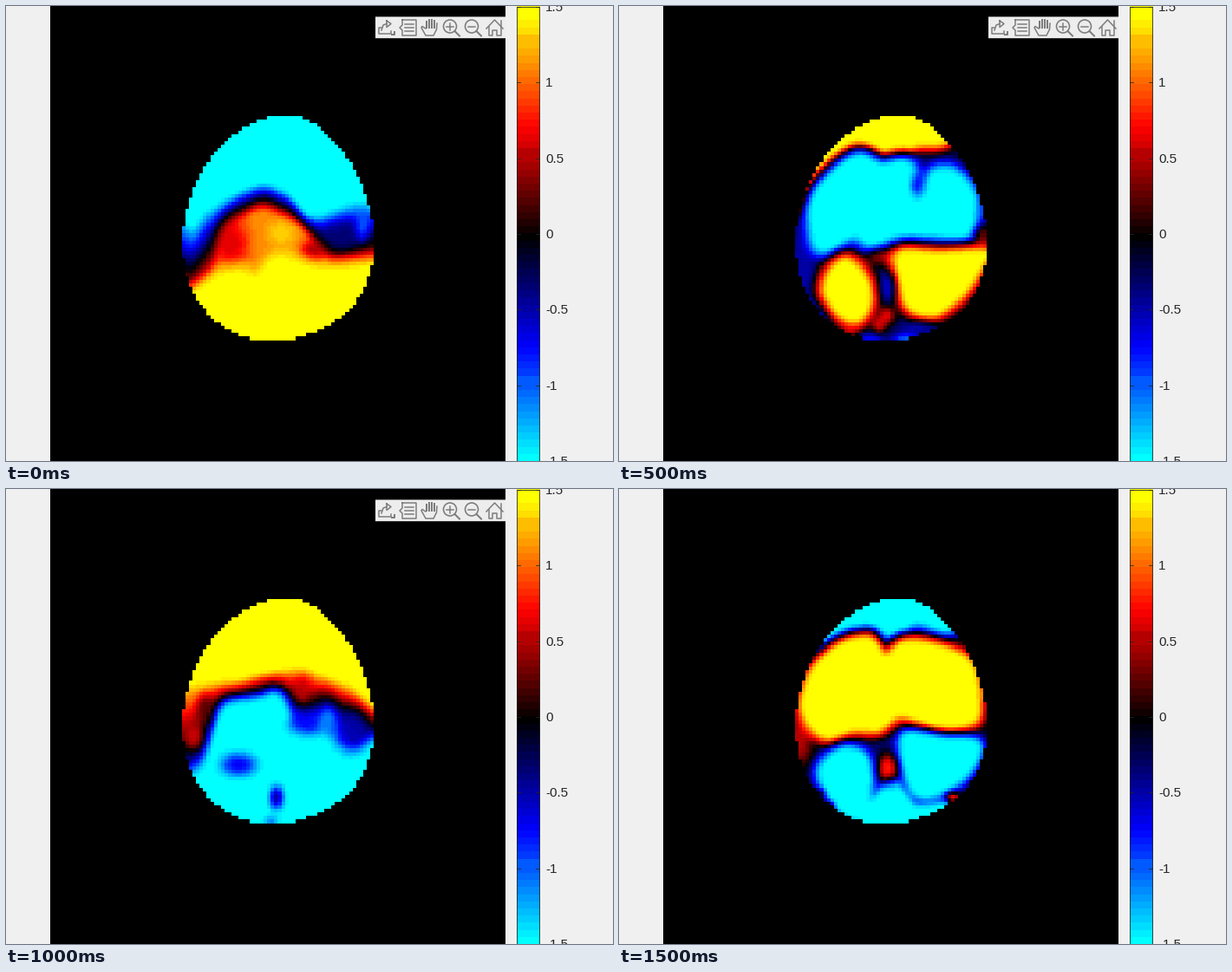
A matplotlib script for the animation above (2000 ms loop, 700 by 525 pixels).

```python
import numpy as np
import matplotlib.pyplot as plt
from matplotlib.animation import FuncAnimation
from matplotlib.colors import LinearSegmentedColormap
from matplotlib.patches import Circle, Rectangle
from matplotlib.path import Path

W, H, DPI = 700, 525, 100
LEFT, N = 51, 128
CELL = H / N
TOP = 1.5
INK, GREY = "#262626", "#7c7c7c"

xs = LEFT + (np.arange(N) + 0.5) * CELL
ys = (np.arange(N) + 0.5) * CELL
X, Y = np.meshgrid(xs, ys)

# An odd number of colours keeps the middle one pure black.
cmap = LinearSegmentedColormap.from_list(
    "coldhot", ["#00ffff", "#0000ff", "#000000", "#ff0000", "#ffff00"], N=63)


def px(size):
    return size * 72 / DPI


# Field helpers; all positions are in stage pixels.

def edge(points):
    """Height of a smooth line through key points, per column."""
    line = np.interp(xs, *zip(*points))
    return np.convolve(np.pad(line, 2, mode="edge"),
                       np.array([1, 2, 3, 2, 1]) / 9, "valid")


def band(upper, lower, start, end):
    """Ramp from one value to another between two lines."""
    a, b = edge(upper), edge(lower)
    return start + (end - start) * np.clip((Y - a) / (b - a), 0, 1)


def below(field, points, value, fade):
    t = np.clip(1 - (edge(points) - Y) / fade, 0, 1)
    return field + (value - field) * t


def smooth_loop(points, steps=5):
    """Closed Catmull-Rom curve through key points."""
    p = np.array(points, float)
    a, c, d = (np.roll(p, k, axis=0) for k in (1, -1, -2))
    out = [p + 0.5 * t * (c - a + t * (2 * a - 5 * p + 4 * c - d
                                       + t * (3 * (p - c) + d - a)))
           for t in np.arange(steps) / steps]
    return np.stack(out, axis=1).reshape(-1, 2)


def blob(field, points, value, fade):
    """Fill a smooth outline with a value that fades out around it."""
    pts = smooth_loop(points)
    dist = np.full(X.shape, np.inf)
    for (ax_, ay), (dx, dy) in zip(pts, np.roll(pts, -1, axis=0) - pts):
        t = ((X - ax_) * dx + (Y - ay) * dy) / (dx * dx + dy * dy)
        t = np.clip(t, 0, 1)
        dist = np.minimum(dist, np.hypot(X - ax_ - t * dx, Y - ay - t * dy))
    inside = Path(pts).contains_points(np.c_[X.ravel(), Y.ravel()])
    dist[inside.reshape(X.shape)] = 0
    return field + (value - field) * np.clip(1 - dist / fade, 0, 1)


def spot(field, x, y, rx, ry, value):
    """Pull the field towards a value in a soft ellipse."""
    r2 = ((X - x) / rx) ** 2 + ((Y - y) / ry) ** 2
    return field + (value - field) * np.exp(-r2 ** 1.5)


def soften(field):
    for axis in (0, 1):
        field = (np.roll(field, 1, axis) + 2 * field
                 + np.roll(field, -1, axis)) / 4
    return field


def egg():
    """Ellipse that is wider below, with its ends leaning sideways."""
    u = np.clip((Y - 256.5) / 130, -1, 1)
    half = 109.5 * np.sqrt(1 - u * u) * (1 + 0.135 * u)
    return np.abs(X - 314 + 8.5 * u ** 5) < half


# The four poses of the oscillation.

def front_cold():
    f = band([(204, 238), (214, 264), (226, 238), (270, 213), (300, 203),
              (328, 217), (345, 241), (365, 242), (400, 223), (424, 226)],
             [(204, 350), (235, 322), (256, 262), (285, 238), (300, 236),
              (330, 250), (345, 260), (362, 288), (380, 308), (424, 306)],
             -1.5, 1.15)
    f = spot(f, 388, 265, 26, 20, -0.35)
    f = spot(f, 411, 254, 8, 17, -1.0)
    f = spot(f, 260, 274, 20, 30, 0.65)
    f = spot(f, 354, 283, 14, 13, 0.5)
    f = spot(f, 318, 262, 16, 14, 1.35)
    return below(f, [(204, 342), (245, 313), (270, 307), (292, 320),
                     (300, 297), (320, 293), (365, 308), (424, 300)],
                 1.5, 20)


def middle_cold():
    f = np.full(X.shape, -0.2)
    f = spot(f, 212, 295, 16, 50, -0.5)
    f = spot(f, 230, 352, 18, 16, -0.7)
    f = blob(f, [(190, 240), (213, 211), (236, 183), (262, 161), (280, 156),
                 (312, 169), (345, 160), (375, 157), (400, 130),
                 (315, 90), (200, 120)], 1.5, 14)
    f = spot(f, 402, 186, 10, 12, 0.1)
    f = blob(f, [(222, 240), (231, 210), (255, 185), (280, 174), (303, 184),
                 (326, 179), (341, 192), (333, 213), (350, 213), (364, 191),
                 (390, 193), (409, 222), (406, 256), (394, 265), (355, 263),
                 (320, 264), (290, 275), (270, 265), (232, 281)], -1.5, 16)
    f = spot(f, 345, 205, 7, 15, -0.75)
    f = spot(f, 420, 264, 10, 10, 0.3)
    f = spot(f, 303, 290, 18, 10, 0.4)
    f = blob(f, [(263, 294), (284, 315), (288, 344), (273, 363), (253, 354),
                 (238, 331), (244, 307)], 1.5, 17)
    f = blob(f, [(323, 286), (370, 286), (424, 284), (418, 299), (396, 332),
                 (364, 355), (336, 348), (326, 325)], 1.5, 16)
    f = spot(f, 310, 324, 9, 19, -0.6)
    f = spot(f, 309, 357, 9, 11, 0.75)
    f = spot(f, 300, 368, 8, 10, 0.7)
    f = spot(f, 267, 374, 9, 7, 0.75)
    f = spot(f, 345, 372, 24, 9, -0.5)
    f = spot(f, 290, 384, 16, 5, -0.9)
    f = spot(f, 330, 384, 16, 5, -1.2)
    return spot(f, 418, 236, 6, 9, -1.0)


def front_hot():
    f = band([(204, 223), (270, 220), (290, 213), (315, 209), (343, 203),
              (357, 211), (400, 226), (424, 252)],
             [(204, 375), (222, 350), (242, 272), (255, 255), (295, 247),
              (312, 240), (323, 262), (343, 292), (372, 262), (390, 288),
              (410, 312), (424, 298)], 1.5, -1.5)
    f = spot(f, 230, 254, 10, 18, 0.25)
    f = spot(f, 217, 286, 12, 16, 0.6)
    f = spot(f, 342, 232, 11, 16, 0.55)
    f = spot(f, 345, 272, 22, 14, -0.75)
    f = spot(f, 372, 270, 8, 16, -1.15)
    f = spot(f, 400, 280, 22, 28, -0.5)
    f = below(f, [(204, 340), (235, 328), (272, 332), (290, 318), (325, 290),
                  (365, 303), (400, 319), (424, 298)], -1.5, 22)
    f = blob(f, [(250, 270), (258, 252), (295, 247), (312, 240), (318, 262),
                 (300, 296), (280, 301), (258, 293)], -1.5, 14)
    f = spot(f, 268, 318, 20, 13, -0.7)
    f = spot(f, 312, 356, 7, 13, -0.35)
    return spot(f, 306, 384, 8, 6, -1.05)


def middle_hot():
    f = np.full(X.shape, -0.15)
    f = spot(f, 208, 290, 15, 30, 0.55)
    f = spot(f, 310, 293, 24, 18, -0.3)
    f = blob(f, [(200, 190), (238, 174), (264, 161), (293, 156), (307, 173),
                 (325, 163), (345, 153), (380, 162), (400, 130), (315, 90),
                 (210, 110)], -1.5, 16)
    f = blob(f, [(212, 246), (225, 208), (255, 180), (290, 173), (308, 194),
                 (328, 177), (375, 184), (407, 205), (414, 255), (405, 269),
                 (370, 274), (325, 261), (300, 277), (270, 277), (240, 286),
                 (220, 270)], 1.5, 15)
    f = blob(f, [(262, 300), (284, 310), (289, 342), (277, 380), (250, 364),
                 (232, 330), (241, 311)], -1.5, 14)
    f = blob(f, [(328, 285), (375, 288), (414, 293), (408, 320), (384, 343),
                 (350, 355), (333, 335)], -1.5, 12)
    f = blob(f, [(282, 392), (301, 350), (315, 335), (328, 351), (345, 367),
                 (380, 364), (378, 392)], -1.5, 7)
    f = spot(f, 310, 322, 11, 17, 0.85)
    for x, y, value in [(229, 352, 0.6), (239, 366, 0.8), (385, 355, 1.2)]:
        f = spot(f, x, y, 7, 5, value)
    return spot(f, 418, 236, 5, 8, 1.2)


head = egg()
fields = [np.where(head, soften(pose()), 0)
          for pose in (front_cold, middle_cold, front_hot, middle_hot)]

fig = plt.figure(figsize=(W / DPI, H / DPI), dpi=DPI, facecolor="#f0f0f0")
ax = fig.add_axes([0, 0, 1, 1])
ax.axis("off")


def show(data, x0, x1):
    return ax.imshow(data, cmap=cmap, vmin=-TOP, vmax=TOP,
                     extent=(x0, x1, H, 0), interpolation="nearest",
                     aspect="auto")


def draw_colorbar():
    show(np.linspace(TOP, -TOP, 64)[:, None], 589, 616)
    ax.add_patch(Rectangle((589, 1), 26, H - 1, fill=False, ec=INK,
                           lw=px(0.8)))
    for value in np.arange(-TOP, TOP + 0.1, 0.5):
        y = H / 2 - value / TOP * (H / 2 - 0.5)
        for x in (589, 611):
            ax.plot([x, x + 4], [y + 0.5] * 2, color=INK, lw=px(0.8))
        ax.text(622, y + 1.5, f"{value:g}", family="Liberation Sans",
                fontsize=px(15.2), color=INK, va="center")


def draw_toolbar():
    parts = [ax.add_patch(Rectangle((426, 12.4), 150, 24.8, fc="#ededed",
                                    ec="none", snap=False, zorder=3))]

    def line(*pts, lw=1.5):
        parts.extend(ax.plot(*zip(*pts), color=GREY, lw=px(lw), zorder=4,
                             solid_joinstyle="round"))

    # export
    line((433, 25), (430, 25), (430, 32), (444, 32), (444, 29))
    line((433, 28), (435, 22), (439, 20.5))
    line((439, 17), (444, 20.5), (439, 24.5), (439, 17))
    line((445, 32.5), (447.5, 32.5), (447.5, 30), lw=2)
    # data tip
    line((457, 16), (473, 16), (473, 34), (457, 34), (457, 28), (454, 25),
         (457, 22), (457, 16))
    for y in (21, 25, 29):
        line((460, y), (470, y))
    # hand
    line((484, 26), (480, 23.5), (479, 25), (484, 34), (493, 34), (496.5, 27),
         (497, 20))
    for i, y in enumerate((18, 16, 15.5, 17)):
        line((484.5 + 3 * i, y), (484.5 + 3 * i, 25), lw=2)
    # zoom in and out
    for x in (512, 537):
        parts.append(ax.add_patch(Circle((x, 23.5), 7.5, fill=False, ec=GREY,
                                         lw=px(1.6), zorder=4)))
        line((x + 5.5, 29), (x + 11, 34.5), lw=2)
        line((x - 4, 23.5), (x + 4, 23.5))
    line((512, 19.5), (512, 27.5))
    # home
    line((554, 26), (563.5, 16), (573, 26))
    line((556.5, 24), (556.5, 34), (561, 34), (561, 28), (566, 28), (566, 34),
         (570.5, 34), (570.5, 17))
    return parts


image = show(fields[0], LEFT, LEFT + H)
draw_colorbar()
toolbar = draw_toolbar()
ax.set_xlim(0, W)
ax.set_ylim(H, 0)


def update(i):
    image.set_data(fields[i])
    for part in toolbar:
        part.set_visible(i < 3)
    return [image, *toolbar]


anim = FuncAnimation(fig, update, frames=4, interval=500, repeat=True,
                     repeat_delay=0)
plt.show()
```
